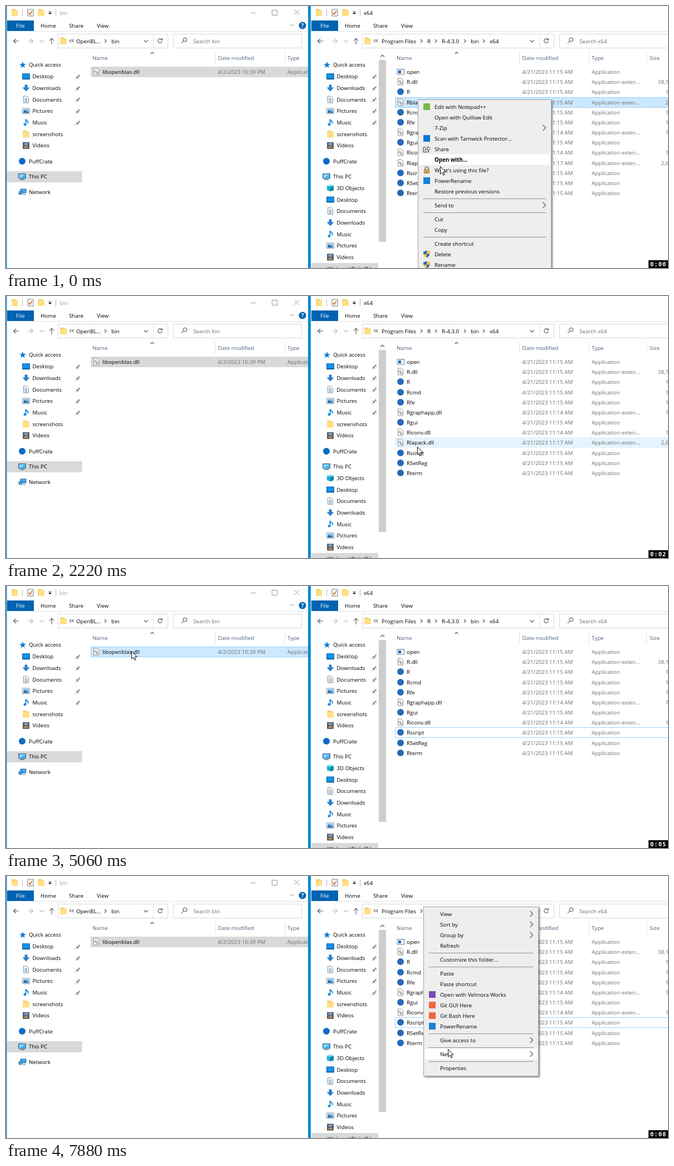
Write an HTML page that moves like this. It is 1188 px wide and 471 px high and loops after 8000 ms.

```html
<!DOCTYPE html>
<html lang="en">
<head>
<meta charset="utf-8">
<title>Replacing a library</title>
<style>
  html, body { margin: 0; width: 100%; height: 100%; overflow: hidden; background: #fff; }
  svg { display: block; width: 100vw; height: 100vh; }
  text { font: 9.78px "Open Sans", "Noto Sans", sans-serif; fill: #000; white-space: pre; }
  .dim { fill: #6d6d6d; }
  .head { fill: #4c607a; }
  .light { fill: #fff; }
  .end { text-anchor: end; }
  .mid { text-anchor: middle; }
  .bold { font-weight: 700; }
  .line { fill: none; stroke: #555; stroke-width: 1.1; }
  .faint { stroke: #b8b8b8; }
  .rule { fill: none; stroke: #e2e2e2; }
  .box { fill: #fff; stroke: #d9d9d9; }
  .row { fill: none; stroke: none; }
  .hover { fill: #e5f3ff; stroke: #e5f3ff; }
  .selected { fill: #cce8ff; stroke: #99d1ff; }
  .focus { stroke: #99d1ff; }
  .idle { fill: #d9d9d9; stroke: #d9d9d9; }
  .caption { fill: #999; }
  .buttons { fill: none; stroke: #999; }
  .active .caption { fill: #000; }
  .active .buttons { stroke: #000; }
  .menu > .panel { fill: #eee; stroke: #a3a3a3; filter: drop-shadow(2px 2px 1.5px rgba(0, 0, 0, .45)); }
  .menu > .sep { stroke: #919191; }
  .menu > .hot { fill: #fff; }
  #clock { font: bold 10.5px "DejaVu Sans Mono", monospace; letter-spacing: 1px; fill: #fff; }
</style>
</head>
<body>
<svg id="stage" viewBox="0 0 1188 471" preserveAspectRatio="none"></svg>
<script>
const LOOP = 8000, SHIFT = 546, PITCH = 18.18, FIRST = 118;

const page = '<path d="M-4.5-6h6l3 3v9h-9z" fill="#fff" stroke="#8c8c8c"/>';
const square = color => `<rect x="-6" y="-6" width="12" height="12" fill="${color}"/>`;
const disc = color => `<circle r="6" fill="${color}"/>`;

const icons = {
  folder: '<path d="M-5.5-6h7v1.5h4v10.5h-11z" fill="#e9bd55"/><path d="M-5.5-4.5h8l1 1h2v9.5h-11z" fill="#ffdf82"/>',
  check: '<path d="M-5-6h10v12h-10z" fill="#fff" stroke="#777"/><path d="M-3 0l2 3 4-6" fill="none" stroke="#d4622a" stroke-width="1.6"/>',
  star: '<path d="M0-6l1.6 4 4.2.2-3.3 2.7 1.2 4.3L0 2.8l-3.7 2.4 1.2-4.3-3.3-2.7 4.2-.2z" fill="#147bd1"/>',
  desktop: '<path d="M-6.5-5h13v10h-13z" fill="#1592e6" stroke="#0a64ad"/><path d="M-6.5 4h13" stroke="#0a4f8c"/>',
  down: '<path d="M-2.5-6h5v5h4L0 6l-6.5-7h4z" fill="#2c7ecb"/>',
  doc: page + '<path d="M-2.5-2h4M-2.5 0h5M-2.5 2h5M-2.5 4h5" stroke="#3f91cf"/>',
  picture: '<path d="M-6.5-5h13v10h-13z" fill="#fff" stroke="#8f9aa3"/><path d="M-5-3.5h10v7h-10z" fill="#75baf0"/><path d="M-5 3.5v-2l3-3 3 3 2-1 2 2v1z" fill="#27679b"/>',
  music: '<path d="M-.5 3v-9q1 3 4 4 1 2-.5 4" fill="none" stroke="#1488db" stroke-width="1.8"/><ellipse cx="-2" cy="3.5" rx="2.6" ry="2.2" fill="#1488db"/>',
  film: '<path d="M-6-6h12v12h-12z" fill="#323a45"/><path d="M-3.5-5h7v4.5h-7z" fill="#7aa1cf"/><path d="M-3.5.5h7v4.5h-7z" fill="#b28c58"/><path d="M-5-5v11M5-5v11" stroke="#ddd" stroke-dasharray="1.2 1.2"/>',
  cloud: disc('#0a6cc4'),
  pc: '<path d="M-6.5-5h13v8.5h-13z" fill="#46b2ee" stroke="#41698a"/><path d="M-5-3.8h10L-3 2.5h-2z" fill="#8bd5fb"/><path d="M-4 5.5h8" stroke="#41698a" stroke-width="1.4"/>',
  network: '<path d="M-3-5h10v7h-10z" fill="#46a6e6" stroke="#326c98"/><circle cx="-3" cy="2" r="3.6" fill="#2577bc"/><path d="M-6 2h6M-3-1v6" stroke="#9dd2f4" stroke-width=".7"/><path d="M1 5h5" stroke="#326c98"/>',
  cube: '<path d="M0-6l6 2v8l-6 2-6-2v-8z" fill="#1fb0d1"/><path d="M0-2l6-2v8l-6 2z" fill="#0a86ac"/><path d="M0-6l6 2-6 2-6-2z" fill="#74dcee"/>',
  disk: '<path d="M-6-3h12v6h-12z" fill="#8b9aa5"/>',
  pin: '<path d="M1-4.5l3.5 3.5-1 .7-.7-.2-2 2v2l-1 1-3.3-3.8 1-1h2l2-2-.2-.7z" fill="#8b949c"/><path d="M-1.5 2l-3 3" stroke="#8b949c"/>',
  dll: page + '<g fill="none" stroke="#8a8a8a" stroke-width="1.1"><circle cx="-1.2" cy="-.5" r="1.5"/><circle cx="1.2" cy="2.5" r="1.5"/></g>',
  app: '<path d="M-6-4.5h12.5v9.5h-12.5z" fill="#fff" stroke="#687b8c"/><path d="M-6-4h12" stroke="#9aafc0" stroke-width="1.5"/><path d="M-4-2h5v5h-5z" fill="#1766b3"/>',
  r: disc('#276ab8'),
  editor: square('#7db645'),
  guard: square('#0a78d4'),
  share: '<path d="M-2-3h-4v8.5h9.5v-3" fill="none" stroke="#333"/><path d="M-3 3q0-5 5-5v-3l4.5 4.3L2 3V.5q-3 0-5 2.5z" fill="#fff" stroke="#333"/>',
  lock: '<path d="M-3-1v-2a3 3 0 0 1 6 0v2" fill="none" stroke="#777" stroke-width="1.7"/><path d="M-4.5-1h9v6.5h-9z" fill="#e3ae50" stroke="#8d7a59"/><path d="M0 1.5v2.5" stroke="#555" stroke-width="1.5"/>',
  rename: square('#1a80d4'),
  shield: '<path d="M0-6.5q3 2 6 2Q6.5 3.5 0 6.5-6.5 3.5-6-4.500q3 0 6-2z" fill="#1c69bd"/><path d="M0-6.5q3 2 6 2V0H0zM0 0v6.5Q-5.5 4-6 0z" fill="#f8c433"/>',
  bench: square('#7c4bb5'),
  git: square('#ee6740')
};

const ico = (name, x, y) => `<g transform="translate(${x} ${y})">${icons[name]}</g>`;
const text = (x, y, s, c = '') => `<text x="${x}" y="${y + 3.5}" class="${c}">${s}</text>`;
const path = (d, c = 'line') => `<path d="${d}" class="${c}"/>`;
const rect = (x, y, w, h, c) => `<rect x="${x}" y="${y}" width="${w}" height="${h}" class="${c}"/>`;
const chevron = (x, y) => path(`M${x - 1.5} ${y - 3}l3 3-3 3`);
const drop = (x, y, c = '') => path(`M${x - 3.5} ${y - 1.5}l3.5 3.5 3.5-3.5`, 'line ' + c);

// Windows

const folders = [
  ['desktop', 'Desktop'], ['down', 'Downloads'], ['doc', 'Documents'],
  ['picture', 'Pictures'], ['music', 'Music'], ['folder', 'screenshots'], ['film', 'Videos']
];
const drives = [
  ['cube', '3D Objects'], ['desktop', 'Desktop'], ['doc', 'Documents'], ['down', 'Downloads'],
  ['music', 'Music'], ['picture', 'Pictures'], ['film', 'Videos'], ['disk', 'Local Disk (C:)']
];

function branch(list, top, pins = 0, pinX = 0) {
  return list.map(([icon, name], i) => {
    const y = top + i * 20.7;
    return ico(icon, 36, y) + text(47.5, y, name) + (i < pins ? ico('pin', pinX, y) : '');
  }).join('');
}

const tree = pinX => ico('star', 30, 106) + text(41, 105.7, 'Quick access') + branch(folders, 126.7, 5, pinX) +
  ico('cloud', 29, 279) + text(41, 279, 'PuffCrate') + ico('pc', 29, 306.5) + text(41, 306.5, 'This PC');

function frame(title, crumbs, barEnd) {
  return ico('folder', 15.5, 12) + path('M29.5 6v12M89.5 6v12', 'line faint') + ico('check', 44, 12) +
    ico('folder', 63, 12) + '<path d="M76 12h6l-3 3z"/>' + path('M76.5 10h5') + text(96, 12, title, 'caption') +
    '<path d="M2 26h48v19h-48z" fill="#0063b1"/>' + text(26, 35, 'File', 'light mid') +
    text(62, 35, 'Home') + text(113, 35, 'Share') + text(163, 35, 'View') +
    path('M50 45.5h700', 'rule') +
    path('M23 63h-9m4-4l-4.5 4 4.5 4') + path('M39 63h9m-4-4l4.5 4-4.5 4', 'line faint') +
    drop(64, 63, 'faint') + path('M82 69v-11m-4 4.5l4-4.5 4 4.5') +
    rect(93.5, 50.5, barEnd - 93, 25, 'box') + ico('folder', 103, 63) +
    path('M117 60l-2.5 2.5 2.5 2.5m4-5l-2.5 2.5 2.5 2.5') +
    crumbs.map(([x, label], i) => (i ? chevron(x - 10.5, 63) : '') + text(x, 63, label)).join('') +
    path(`M${barEnd - 25.5} 51v24`, 'rule') + drop(barEnd - 39, 63) +
    path(`M${barEnd - 10.5} 60.5a3.7 3.7 0 1 0 .5 3m.5-5.500v3h-3`) +
    rect(barEnd + 10.5, 50.5, 230, 25, 'box') +
    path(`M${barEnd + 25} 67l3.5-4m-.5-2.500a3.3 3.3 0 1 0 6.600 0a3.3 3.3 0 1 0-6.600 0`) +
    text(barEnd + 46, 63, 'Search ' + title, 'dim') +
    text(155, 93, 'Name', 'head') + text(380.5, 93, 'Date modified', 'head') +
    text(505, 93, 'Type', 'head') + text(609, 93, 'Size', 'head') +
    path('M259.5 86l3-3 3 3') + path('M375.5 82v22M500.5 82v22M603.5 82v22', 'rule');
}

function file(name, icon, date, size, id) {
  const type = icon === 'dll' ? 'Application exten...' : 'Application';
  return `<g id="${id}">` + rect(152.5, -8.5, 520, 18, 'row') + ico(icon, 162, 0) + text(173, 0, name) +
    text(380, 0, date, 'dim') + text(505, 0, type, 'dim') + text(669, 0, size, 'dim end') + '</g>';
}

// [name, icon, minute, size]
const files = [
  ['open', 'app', 15, '87 KB'], ['R.dll', 'dll', 15, '38,160 KB'], ['R', 'r', 15, '148 KB'],
  ['Rblas.dll', 'dll', 15, '296 KB'], ['Rcmd', 'r', 15, '147 KB'], ['Rfe', 'r', 15, '148 KB'],
  ['Rgraphapp.dll', 'dll', 14, '740 KB'], ['Rgui', 'r', 15, '87 KB'], ['Riconv.dll', 'dll', 14, '153 KB'],
  ['Rlapack.dll', 'dll', 17, '2,640 KB'], ['Rscript', 'r', 15, '92 KB'], ['RSetReg', 'r', 15, '87 KB'],
  ['Rterm', 'r', 15, '87 KB']
];

function leftWindow() {
  return '<g id="left">' + rect(2.5, 297.5, 133.5, 19, 'idle') +
    frame('bin', [[126, 'OpenBL...'], [189, 'bin']], 290) + tree(129) +
    ico('network', 29, 334) + text(41, 334, 'Network') +
    path('M439 12.5h9M477.5 7.5h9v9h-9zM517 7l9 9m0-9l-9 9', 'buttons') +
    drop(513, 34, 'faint') + '<circle cx="532" cy="35" r="6.5" fill="#0063b1"/>' + text(532, 35, '?', 'light bold mid') +
    file('libopenblas.dll', 'dll', '4/2/2023 10:39 PM', '', 'blas') + '</g>';
}

function rightWindow() {
  return '<path d="M542 0h5v471h-5z" fill="#0b8bd0"/><path d="M547 0h641v471h-641z" fill="#fff"/>' +
    `<g id="right" transform="translate(${SHIFT})">` + rect(2.5, 462.5, 119, 10, 'idle') +
    frame('x64', [[128, 'Program Files'], [210, 'R'], [236, 'R-4.3.0'], [288, 'bin'], [322, 'x64']], 437) +
    tree(115) + branch(drives, 327.3) +
    '<path d="M123 97h13v327h-13z" fill="#cdcdcd"/>' + path('M126 91.5l3.5-3.5 3.5 3.5') +
    files.map(([name, icon, min, size], i) => file(name, icon, `4/21/2023 11:${min} AM`, size, 'file' + i)).join('') + '</g>';
}

// Context menus: [label, icon, flag]; flag ">" opens a submenu, "b" is bold; "-" is a rule

function fileMenu(extra, icon) {
  return [['Edit with Notepad++', 'editor'], ['Open with Quillow Edit'], ['7-Zip', '', '>'],
    ['Scan with Tarnwick Protector...', 'guard'], ['Share', 'share'], ['Open with...', '', 'b'], ...extra,
    ["What's using this file?", 'lock'], ['PowerRename', 'rename'], ['Restore previous versions'], '-',
    ['Send to', '', '>'], '-', ['Cut'], ['Copy'], '-',
    ['Create shortcut'], ['Delete', icon], ['Rename', icon], '-', ['Properties']];
}
const folderMenu = [['View', '', '>'], ['Sort by', '', '>'], ['Group by', '', '>'], ['Refresh'], '-',
  ['Customize this folder...'], '-', ['Paste'], ['Paste shortcut'], ['Open with Velmora Works', 'bench'],
  ['Git GUI Here', 'git'], ['Git Bash Here', 'git'], ['PowerRename', 'rename'], '-',
  ['Give access to', '', '>'], '-', ['New', '', '>'], '-', ['Properties']];

const menus = [
  { x: 739.5, y: 168, w: 239, from: 0, to: 560, items: fileMenu([], 'shield'), linger: [140, 5] },
  { x: 733.5, y: -75, w: 239, from: 2600, to: 3840, items: fileMenu([], 'shield') },
  { x: 224.5, y: 117, w: 240, from: 5470, to: 6430, items: fileMenu(['-', ['Give access to', '', '>']]) },
  { x: 749.5, y: 55, w: 206, from: 7420, to: LOOP, items: folderMenu }
];

function buildMenu(m, i) {
  let y = 13, body = '';
  m.spots = [];
  for (const item of m.items) {
    if (item === '-') {
      body += path(`M9 ${y - 5.5}h${m.w - 18}`, 'sep');
      y += 6;
      continue;
    }
    const [label, icon, flag] = item;
    if (icon) body += ico(icon, 15.5, y);
    body += text(29.5, y, label, flag === 'b' ? 'bold' : '');
    if (flag === '>') body += path(`M${m.w - 15} ${y - 5}l5 5-5 5`);
    m.spots.push(y);
    y += 19;
  }
  return `<g class="menu" id="menu${i}" transform="translate(${m.x} ${m.y})">` +
    rect(0, .5, m.w, y - 5, 'panel') + rect(2, -9.5, m.w - 4, 19, 'hot') + body + '</g>';
}

const stage = document.getElementById('stage');
stage.innerHTML = '<path d="M0 0h1188v471h-1188z" fill="#fff"/>' + leftWindow() +
  '<path d="M0 0h1.5v471h-1.5z" fill="#0b8bd0"/>' + rightWindow() + menus.map(buildMenu).join('') +
  '<path d="M1153 457h35v14h-35z"/><text id="clock" x="1156" y="467.5"></text>' +
  '<path id="cursor" d="M.5.5v13.500l3.100-2.900 2.300 5 2.200-1-2.200-4.800h4.300z" fill="#fff" stroke="#111"/>';

// Motion: [time, x, y]

const track = [
  [0, 779, 288], [140, 779, 288], [500, 771, 447], [640, 771, 447], [1290, 752, 425], [1530, 727, 380],
  [2000, 737, 282], [2220, 738, 271], [2450, 734, 262], [3160, 734, 262], [3450, 764, 211], [4280, 764, 211],
  [5000, 225, 117], [5750, 225, 117], [6030, 279, 320], [6300, 272, 378], [6500, 272, 378],
  [7250, 750, 360], [7500, 750, 360], [7860, 793, 311], [LOOP, 793, 311]
];

function cursorAt(t) {
  const i = track.findIndex(k => k[0] > t);
  const [t0, x0, y0] = track[i - 1], [t1, x1, y1] = track[i];
  const p = (t - t0) / (t1 - t0);
  return [x0 + (x1 - x0) * p, y0 + (y1 - y0) * p];
}

const el = id => document.getElementById(id);
const show = (node, on) => node.style.display = on ? '' : 'none';
const place = (node, x, y) => node.setAttribute('transform', `translate(${x} ${y})`);
const between = (t, a, b) => t >= a && t < b;
const removedAt = { 3: 980, 9: 3980 };

function draw(t) {
  const [cx, cy] = cursorAt(t);
  const open = menus.some(m => between(t, m.from, m.to));
  const overRow = y => !open && Math.abs(cy - y) < PITCH / 2;
  const leftOn = between(t, 5350, 7300), rightOn = !between(t, 5200, 7300);
  el('left').classList.toggle('active', leftOn);
  el('right').classList.toggle('active', rightOn);

  let n = 0;
  files.forEach((f, i) => {
    const row = el('file' + i), removed = t >= removedAt[i];
    show(row, !removed);
    if (removed) return;
    const y = Math.round(FIRST + PITCH * n++);
    place(row, 0, y);
    const selected = i === 3 || (i === 9 && t >= 2450);
    const focus = i === 10 && t >= 3980 && rightOn;
    const hover = cx >= 698 && overRow(y);
    const look = selected ? ' selected' : (hover ? ' hover' : '') + (focus ? ' focus' : '');
    row.firstChild.setAttribute('class', 'row' + look);
  });

  place(el('blas'), 0, FIRST);
  const lit = leftOn || (between(cx, 152, 541) && overRow(FIRST));
  el('blas').firstChild.setAttribute('class', 'row ' + (lit ? 'selected' : 'idle'));

  menus.forEach((m, i) => {
    const node = el('menu' + i), on = between(t, m.from, m.to);
    show(node, on);
    if (!on) return;
    let hot = between(cx, m.x, m.x + m.w) ? m.spots.findIndex(y => Math.abs(cy - m.y - y) <= 9.5) : -1;
    if (m.linger && t < m.linger[0]) hot = m.linger[1];
    const bar = node.querySelector('.hot');
    show(bar, hot >= 0);
    if (hot >= 0) place(bar, 0, m.spots[hot]);
  });

  el('clock').textContent = '0:0' + Math.floor((t + 130) / 1000);
  place(el('cursor'), Math.round(cx), Math.round(cy));
}

const start = performance.now();
function tick() {
  draw((performance.now() - start) % LOOP);
  requestAnimationFrame(tick);
}
tick();
</script>
</body>
</html>
```
